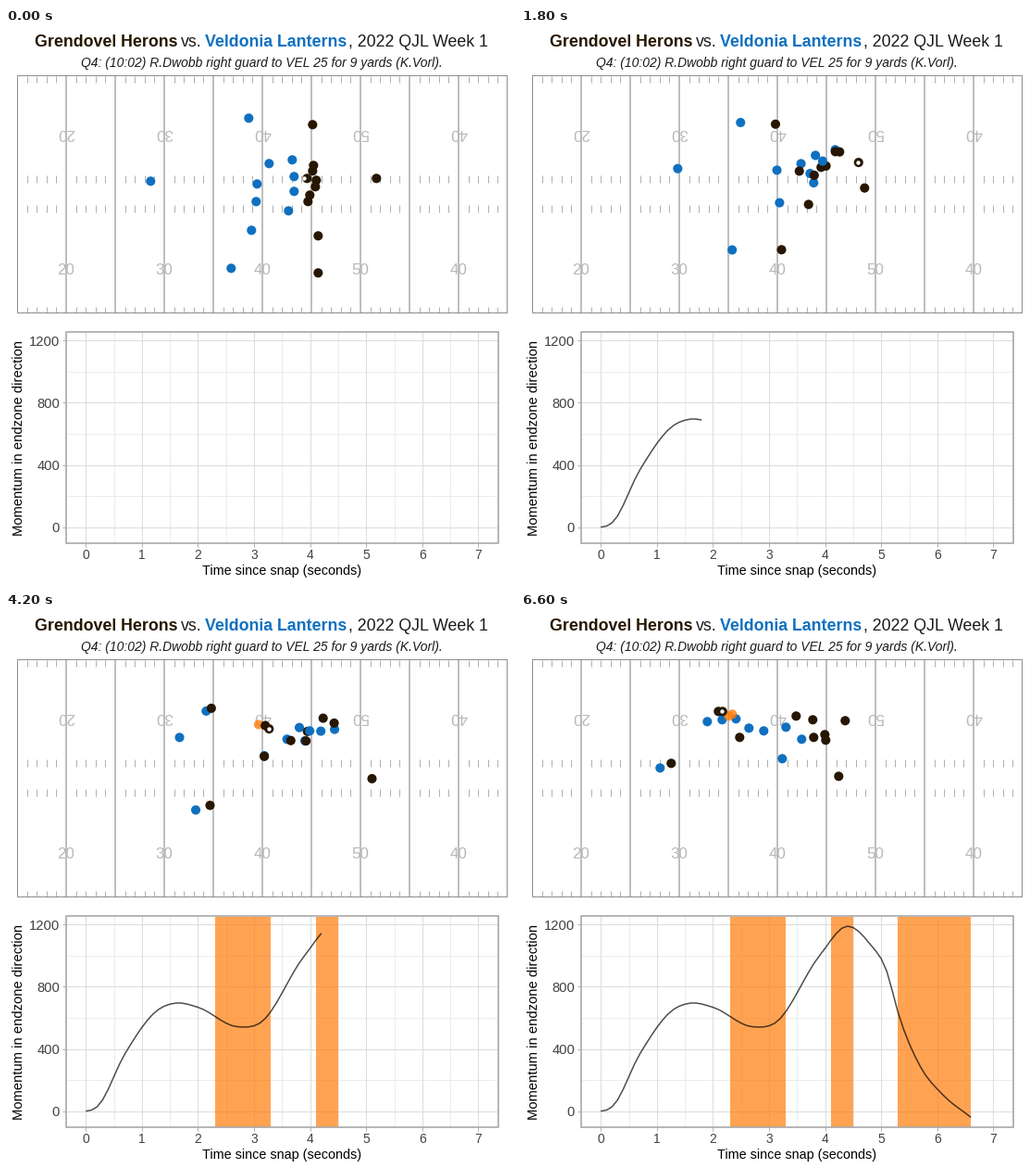
These frames come from a looping animation (550x600 px, 7.2 s). A matplotlib script:

```python
import numpy as np
import matplotlib.pyplot as plt
from matplotlib.animation import FuncAnimation
from matplotlib.colors import to_rgba
from matplotlib.patches import Rectangle

W, H, DPI = 550, 600, 100
PT = 72 / DPI  # points per pixel
BROWN, BLUE, ORANGE = "#271600", "#0f70c0", "#ff7c0a"
INK, GREY = "#1a1a1a", "#bebebe"
FRAMES, LAST = 72, 66
TIMES = np.arange(LAST + 1) / 10
MIDPLAY, WHISTLE = 3.5, 6.6
CONTACTS = [(2.3, 3.3), (4.1, 4.5), (5.3, 6.6)]

plt.rcParams["font.family"] = "Liberation Sans"
fig = plt.figure(figsize=(W / DPI, H / DPI), dpi=DPI, facecolor="white")
ax = fig.add_axes([0, 0, 1, 1])
ax.set_xlim(0, W)
ax.set_ylim(H, 0)
ax.axis("off")


def line(x0, y0, x1, y1, color, width=1, z=1):
    ax.plot([x0, x1], [y0, y1], color=color, lw=width * PT, zorder=z,
            solid_capstyle="butt")


def frame(x0, y0, x1, y1, color, width):
    ax.add_patch(Rectangle((x0, y0), x1 - x0, y1 - y0, fill=False,
                           ec=color, lw=width * PT, zorder=4))


def label(x, y, text, px, color="black", ha="center", angle=0, **style):
    """Write text whose capitals are centred on (x, y)."""
    drop, turn = 0.345 * px, np.radians(angle)
    ax.text(x + drop * np.sin(turn), y + drop * np.cos(turn), text,
            fontsize=px * PT, color=color, ha=ha, va="baseline",
            rotation=angle, rotation_mode="anchor", zorder=2, **style)


def draw_titles():
    label(31, 14.3, "Grendovel Herons", 17.8, BROWN, "left", weight="bold")
    label(188.5, 14.3, "vs.", 17.8, INK, "left")
    label(215, 14.3, "Veldonia Lanterns", 17.8, BLUE, "left", weight="bold")
    label(369.5, 14.3, ", 2022 QJL Week 1", 17.8, INK, "left")
    label(276.5, 37,
          "Q4: (10:02) R.Dwobb right guard to VEL 25 for 9 yards (K.Vorl).",
          13.95, INK, style="italic")


def draw_field():
    for yard in range(1, 50):
        x = 12 + 10.6 * yard
        if yard % 5 == 0:
            line(x, 51, x, 307, GREY, 2)
            continue
        for top, length in [(52, 7), (159, 8), (191, 8), (301, 6)]:
            line(x, top, x, top + length, "#b0b0b0")
    for k, yards in enumerate((20, 30, 40, 50, 40)):
        label(65 + 106 * k, 260.5, str(yards), 17, "#b8b8b8")
        label(65 + 106 * k, 114.5, str(yards), 17, "#b8b8b8", angle=180)
    frame(12, 51, 541, 307, "#8c8c8c", 1)


def chart_x(t):
    return 86.2 + 60.6 * np.asarray(t)


def chart_y(m):
    return 538.6 - 0.1677 * np.asarray(m)


def draw_chart():
    left, top, right, bottom = 65, 328, 532, 556
    for t in range(8):
        x = float(chart_x(t))
        line(x, top, x, bottom, "#dcdcdc")
        line(x, bottom, x, bottom + 4, "#b3b3b3")
        label(x, 568.5, str(t), 13.8, "#404040")
        if t < 7:
            line(x + 30.3, top, x + 30.3, bottom, "#ececec", z=0.9)
    for m in range(0, 1201, 400):
        y = float(chart_y(m))
        line(left, y, right, y, "#dcdcdc")
        line(left - 4, y, left, y, "#b3b3b3")
        label(58, y + 0.3, str(m), 14.7, "#404040", "right")
        if m < 1200:
            line(left, y - 33.5, right, y - 33.5, "#ececec", z=0.9)
    frame(left, top, right, bottom, "#a6a6a6", 1.6)
    label(298.5, 585.5, "Time since snap (seconds)", 14.4)
    label(13, 442.5, "Momentum in endzone direction", 14.7, angle=90)


def smooth_curve(points, t):
    """Cubic curve through (time, value) points, level at the start."""
    keys, p = np.array(points, float).T
    v = np.gradient(p, keys)
    v[0] = 0
    i = np.clip(np.searchsorted(keys, t, "right") - 1, 0, len(keys) - 2)
    h = keys[i + 1] - keys[i]
    s = (t - keys[i]) / h
    return ((1 + 2 * s) * (1 - s) ** 2 * p[i] + s * (1 - s) ** 2 * h * v[i]
            + s ** 2 * (3 - 2 * s) * p[i + 1] + s ** 2 * (s - 1) * h * v[i + 1])


def route(start, middle, end):
    """Ease from the snap to midplay, then speed up towards the whistle."""
    start, middle, end = np.array([start, middle, end], float)
    s = np.clip(TIMES / MIDPLAY, 0, 1)[:, None]
    u = np.clip((TIMES - MIDPLAY) / (WHISTLE - MIDPLAY), 0, 1)[:, None]
    return (start + (middle - start) * s * s * (3 - 2 * s)
            + (end - middle) * u ** 1.3)


players = []


def player(color, start, middle, end, tackle=None):
    path = route(start, middle, end)
    players.append((path, color, tackle))
    return path


# Defence
player(BLUE, (284, 146), (349, 129), (286, 124))
player(BLUE, (309, 142), (367, 121), (282, 158))
player(BLUE, (311, 176), (313, 139), (246, 125))
player(BLUE, (305, 197), (326, 139), (303, 137))
player(BLUE, (271, 168), (331, 126), (232, 115))
player(BLUE, (265, 218), (292, 161), (201, 118))
player(BLUE, (243, 259), (214, 221), (150, 168))
player(BLUE, (270, 187), (282, 122), (217, 116), tackle=CONTACTS[1])
player(BLUE, (156, 165), (181, 139), (224, 112), tackle=CONTACTS[2])
player(BLUE, (262, 97), (214, 106), (228, 110), tackle=CONTACTS[2])

# Offence
player(BROWN, (331, 104), (223, 103), (213, 107))
player(BROWN, (332, 148), (355, 120), (350, 117))
player(BROWN, (331, 154), (347, 114), (315, 116))
player(BROWN, (325, 162), (323, 139), (329, 138))
player(BROWN, (334, 171), (325, 128), (328, 132))
player(BROWN, (328, 180), (306, 139), (316, 135))
player(BROWN, (326, 187), (277, 124), (297, 112))
player(BROWN, (337, 224), (286, 159), (236, 135))
player(BROWN, (337, 264), (230, 216), (162, 163))
passer = player(BROWN, (335, 164), (404, 180), (343, 177))
player(BLUE, (311, 160), (339, 128), (262, 128), tackle=CONTACTS[0])
carrier = player(BROWN, (400, 162), (315, 129), (217, 107))

momentum = smooth_curve(
    [(0, 0), (0.2, 27), (0.7, 370), (1.3, 655), (1.6, 695), (2, 668),
     (2.7, 543), (3.1, 565), (3.9, 1000), (4.4, 1190), (4.8, 1075),
     (5.1, 900), (5.3, 635), (5.7, 285), (6.1, 105), (6.6, -40)], TIMES)

# The carrier's downfield position follows from the momentum
gain = np.cumsum(momentum) - momentum / 2
carrier[:, 0] = 400 - 182.5 * gain / gain[-1]

# Snap to the passer, then a handoff to the carrier
snap = np.clip(TIMES / 0.3, 0, 1)[:, None]
handoff = np.clip((TIMES - 1.2) / 0.2, 0, 1)[:, None]
held = (1 - snap) * np.array([322, 162]) + snap * passer
ball_path = (1 - handoff) * held + handoff * (carrier + [-0.7, 0])

draw_titles()
draw_field()
draw_chart()

bands = []
for begin, end in CONTACTS:
    x0, x1 = chart_x([begin, end])
    bands.append(ax.add_patch(Rectangle((x0, 329), x1 - x0, 227, fc=ORANGE,
                                        alpha=0.7, lw=0, zorder=2)))
curve, = ax.plot([], [], color="black", alpha=0.7, lw=1.5 * PT, zorder=3,
                 solid_capstyle="butt")
blank = np.zeros(len(players))
dots = ax.scatter(blank, blank, s=(10.1 * PT) ** 2, lw=0, zorder=5)
ball = ax.scatter([0], [0], s=(4.4 * PT) ** 2, c="white", lw=0, zorder=6)


def dot_color(color, tackle, t):
    if tackle and tackle[0] <= t <= tackle[1]:
        return to_rgba(ORANGE, 0.8)
    return to_rgba(color)


def draw(i):
    i = min(i, LAST)
    t = TIMES[i]
    dots.set_offsets([path[i] + 0.3 for path, _, _ in players])
    dots.set_facecolor([dot_color(c, tackle, t) for _, c, tackle in players])
    ball.set_offsets([ball_path[i] + 0.3])
    curve.set_data(chart_x(TIMES[:i + 1]), chart_y(momentum[:i + 1]))
    for band, (begin, _) in zip(bands, CONTACTS):
        band.set_visible(t >= begin)
    return [dots, ball, curve, *bands]


anim = FuncAnimation(fig, draw, frames=FRAMES, interval=100, repeat=True,
                     repeat_delay=0, blit=False)
plt.show()
```
